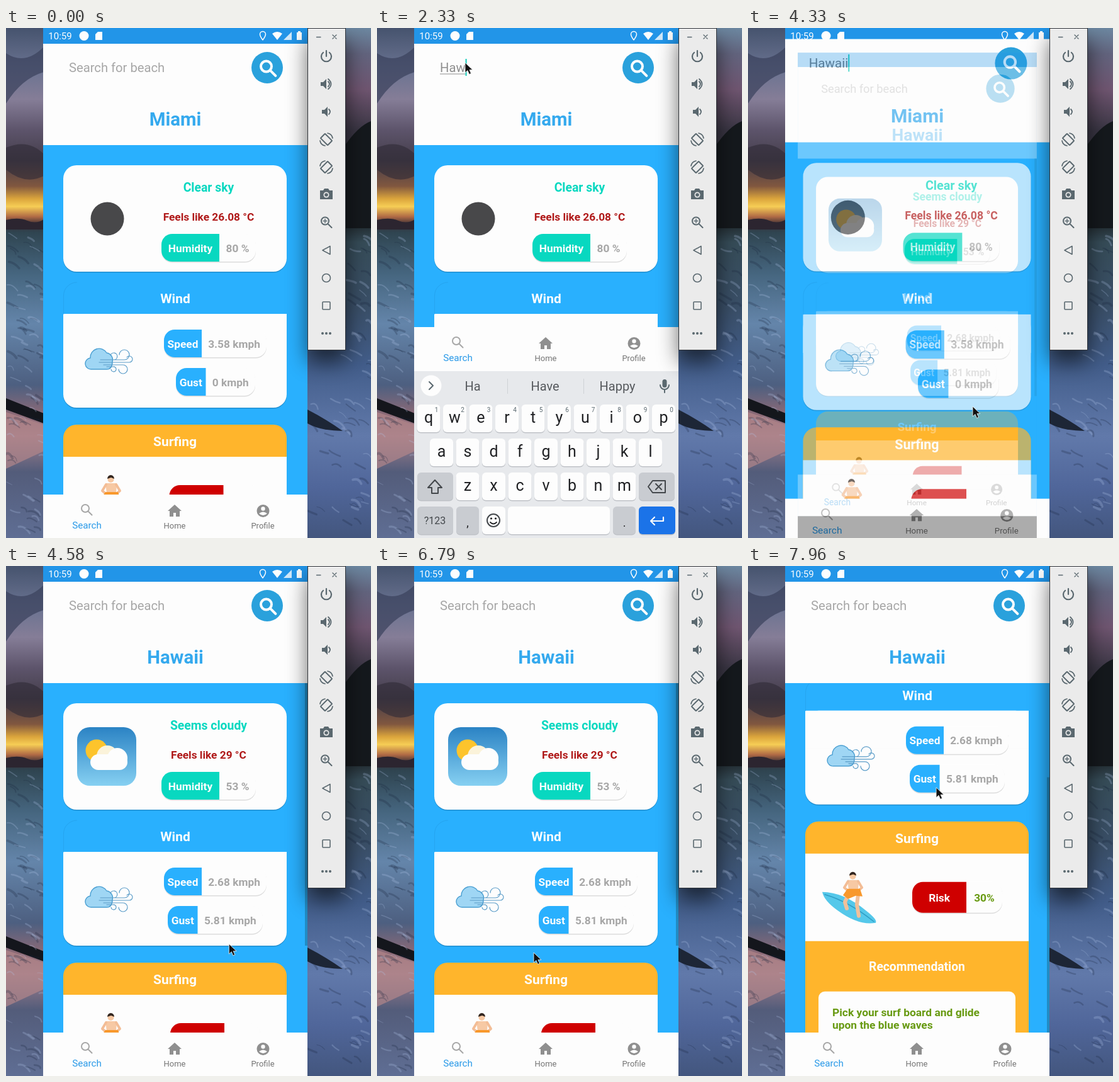
An HTML page that plays this animation: 580 by 810 pixels, repeating every 8000 ms.

```html
<!DOCTYPE html>
<html lang="en">
<head>
<meta charset="utf-8">
<title>Beach weather app</title>
<style>
html, body { margin: 0; width: 100%; height: 100%; overflow: hidden; }
svg { display: block; width: 580px; height: 810px; font-family: Roboto, "Open Sans", sans-serif; }
</style>
</head>
<body>
<svg id="stage" viewBox="0 0 580 810" xmlns="http://www.w3.org/2000/svg"></svg>
<script>
const LOOP = 8000;
const WHITE = '#fdfdfd', BLUE = '#29b0fe', PANEL = '#ebebeb', KEYS = '#e7e9ec', DARK_KEY = '#c9ccd1';
const GRAY = '#a7a7a7', ICON = '#5a686f', YELLOW = '#ffb52c', MINT = '#08d8c0';
const stage = document.getElementById('stage');

// ---- drawing helpers ----
const LEFT = 'style="text-anchor:start"';
const text = (x, y, size, fill, str, opt = '') =>
  `<text x="${x}" y="${y}" font-size="${size}" fill="${fill}" text-anchor="middle" ${opt}>${str}</text>`;
const bold = (x, y, size, fill, str, opt = '') => text(x, y, size, fill, str, 'font-weight="700" ' + opt);
const rect = (x, y, w, h, fill, r = 0, opt = '') =>
  `<rect x="${x}" y="${y}" width="${w}" height="${h}" rx="${r}" fill="${fill}" ${opt}/>`;
const circle = (x, y, r, fill, opt = '') => `<circle cx="${x}" cy="${y}" r="${r}" fill="${fill}" ${opt}/>`;
const path = (d, fill, opt = '') => `<path d="${d}" fill="${fill}" ${opt}/>`;
const line = (d, color, w, opt = '') =>
  path(d, 'none', `stroke="${color}" stroke-width="${w}" stroke-linecap="round" stroke-linejoin="round" ${opt}`);
const at = (x, y, body, opt = '') => `<g transform="translate(${x} ${y}) ${opt}">${body}</g>`;
const lens = (x, y, r, color, w) =>
  line(`M${x - r} ${y}a${r} ${r} 0 1 1 ${2 * r} 0a${r} ${r} 0 1 1 ${-2 * r} 0M${x + r * .75} ${y + r * .75}l${r} ${r}`, color, w);
const grad = (id, stops) => `<linearGradient id="${id}" x2="0" y2="1">` +
  stops.map(([o, c]) => `<stop offset="${o}" stop-color="${c}"/>`).join('') + '</linearGradient>';

function pill(x, y, w, h, tagW, color, tag, value, valueFill = GRAY) {
  const r = 17;
  return rect(x, y + 1.5, w, h, '#dcdcdc', r) + rect(x, y, w, h, WHITE, r) +
    path(`M${x + tagW} ${y}H${x + r}a${r} ${r} 0 0 0 ${-r} ${r}V${y + h - r}a${r} ${r} 0 0 0 ${r} ${r}H${x + tagW}Z`, color) +
    bold(x + tagW / 2, y + h / 2 + 6.5, 17.3, WHITE, tag) +
    bold(x + (tagW + w) / 2, y + h / 2 + 6.5, 17.3, valueFill, value);
}

// ---- wallpaper ----
function wallpaper() {
  let seed = 7;
  const rnd = () => (seed = seed * 16807 % 2147483647) / 2147483647;
  let s = rect(0, 0, 60, 810, 'url(#skyL)') + rect(479, 0, 101, 810, 'url(#skyR)') +
    path('M0 40Q30 60 60 30V70Q25 80 0 120Z', '#39415c', 'opacity=".7"') +
    path('M0 190Q35 175 60 200V235Q30 250 0 225Z', '#2f2a36', 'opacity=".6"') +
    path('M0 305Q20 300 34 306T60 304V320H0Z', '#2c2530') +
    path('M0 588L60 612V628L0 606Z', '#14161c') +
    path('M0 610L60 630V672L0 700Z', '#b3868a', 'opacity=".7"') +
    path('M536 190Q560 155 580 148V318H536Z', '#15191d') +
    path('M479 606Q510 622 535 640Q500 640 479 628Z', '#1d2636');
  for (let i = 0; i < 150; i++) {
    const left = i % 2, x = left ? rnd() * 56 : 480 + rnd() * 96, y = 325 + rnd() * 480;
    const tone = rnd() > .5 ? '#b4c8ea' : '#17243c';
    s += line(`M${x} ${y}q${4 + rnd() * 6} ${-4 + rnd() * 9} ${8 + rnd() * 10} ${3 + rnd() * 8}`, tone, 1 + rnd() * 3, 'opacity=".25"');
  }
  return s;
}

// ---- phone screen ----
const windIcon =
  path('M136 542a9 9 0 0 1-2-18a14 14 0 0 1 26-8a11 11 0 0 1 9 14q0 12-9 12Z', '#9fd6f4', 'stroke="#4a9fd2" stroke-width="1.4"') +
  line('M150 527H188a8 8 0 1 0-8-8M148 531H196a5 5 0 1 0-4-8M155 535H186a7 7 0 1 1-7 7M165 527h6a5.5 5.5 0 1 0-5-7M160 538h10a4 4 0 1 1-3 4', '#5a9cc8', 1.2);

const surfer = at(0, 112,
  path('M118 630Q152 630 188 660Q206 674 203 679Q176 684 142 659Q121 644 118 630Z', '#55c8ea') +
  line('M122 634Q160 645 200 677', '#2f9cc4', 1.5) +
  line('M159 635L154 646L157 656M175 634L173 650L176 668', '#f2c09a', 6) +
  path('M158 611H176L175 627H160Z', '#f7c9a4') +
  line('M159 613L153 623L160 629M175 613L181 623L174 629', '#f3bd96', 4) +
  path('M158 625H178L182 637L171 636L159 641L151 635Z', '#f8982c') +
  circle(166.5, 605, 5, '#f7c9a4') + path('M161 604a5.5 6 0 0 1 11 0l-5-2Z', '#33261f'));

const moon = circle(161, 303, 26.5, '#48484a');
const cloudy = rect(113, 256, 94, 93, 'url(#tile)', 20) + circle(144, 293, 17.5, '#fdc42c') +
  circle(161, 302, 17, '#fbf3da') + circle(177, 305, 16, WHITE) + rect(134, 299, 59, 25, WHITE, 12.5);

const statusIcons = text(86, 18, 15, WHITE, '10:59') + circle(124, 12.5, 7.5, WHITE) +
  path('M146 6H153V19H142V10Z', WHITE) +
  line('M408 19q-4.500-6-4.500-9a4.500 4.500 0 0 1 9 0q0 3-4.500 9Z', WHITE, 1.5) +
  path('M431 19L423 9Q431 3 439 9Z', WHITE) + path('M454 6V19H441Z', WHITE, 'opacity=".8"') +
  path('M462 7h2V5h4v2h2V19H462Z', WHITE);

const navBar = key => `<g id="${key}nav">` + rect(59, 741, 420, 73, WHITE) +
  lens(126, 763, 6, GRAY, 2) + text(128.5, 795, 15.2, '#2a9ae8', 'Search') +
  path('M268 757L257 767H260V776H266V770H270V776H276V767H279Z', '#8f8f8f') + text(268, 795, 13, '#757575', 'Home') +
  circle(408.5, 767, 10, '#8f8f8f') + circle(408.5, 763.5, 3.2, WHITE) + path('M402 771q6.500-5 13 0q-6.500 6-13 0Z', WHITE) +
  text(408, 795, 13, '#757575', 'Profile') + '</g>' + rect(59, 814, 420, 60, '#000');

const shadow = (y, h) => rect(91, y + 1.5, 355, h, '#238fcf', 21);

function screen(key, d) {
  const cards =
    shadow(218, 169) + rect(91, 218, 355, 169, WHITE, 21) + d.icon +
    bold(322, 260, 19.4, MINT, d.sky) + bold(322, 306, 17.3, '#b01a1a', `Feels like ${d.feels} °C`) +
    pill(247, 327, 150, 44, 92, MINT, 'Humidity', d.humidity + ' %') +
    shadow(500, 103) + rect(91, 454, 355, 149, WHITE, 21) + rect(91, 454, 355, 60, WHITE) +
    line('M91.500 454V425a21 21 0 0 1 21-21', '#25a4f0', 1) + bold(269, 437, 21, WHITE, 'Wind') + windIcon +
    pill(251, 479, 163, 44, 60, BLUE, 'Speed', d.speed + ' kmph') +
    pill(d.gustX, 540, d.gustW, 44, 47.5, BLUE, 'Gust', d.gust + ' kmph') +
    rect(91, 630, 355, 460, YELLOW, 21) + rect(91, 681, 355, 139, WHITE) +
    bold(268.5, 664, 21, WHITE, 'Surfing') + surfer +
    pill(d.riskX, 726, 665 - 2 * d.riskX, 49, 86, '#cf0000', 'Risk', d.risk, '#689a12') +
    bold(268.5, 867, 19.3, WHITE, 'Recommendation') + rect(112, 900, 313, 120, WHITE, 10) +
    bold(134, 939, 17.4, '#689a12', 'Pick your surf board and glide', LEFT) +
    bold(134, 959, 17.4, '#689a12', 'upon the blue waves', LEFT);
  return `<g id="${key}">` + rect(59, 0, 420, 814, BLUE) + `<g id="${key}scroll">${cards}</g>` +
    rect(59, 25, 420, 161, WHITE) + rect(59, 0, 420, 25, '#2295e8') +
    text(100, 70, 20.2, GRAY, 'Search for beach', `id="${key}hint" ${LEFT}`) +
    circle(415, 63, 25, '#2aa1dc') + lens(413.5, 61, 8.5, WHITE, 4) +
    bold(269, 155, 29.4, '#34a9ee', d.place) + (d.extra || '') + navBar(key) + '</g>';
}

// ---- keyboard ----
function keyboard() {
  const ink = '#202124', mark = '#44484c', rule = '#cfd2d6';
  const key = (x, y, w, fill = WHITE) => rect(x, y + 1.5, w, 44, '#bfc2c7', 6) + rect(x, y, w, 44, fill, 6);
  let s = rect(59, 545, 420, 320, KEYS) + circle(86, 568, 16.5, WHITE);
  const row = (chars, x0, y) => [...chars].forEach((c, i) => {
    const x = x0 + i * 41.5;
    s += key(x - 18.5, y, 37) + text(x, y + 29, 25, ink, c);
    if (y < 600) s += text(x + 12.5, y + 11.5, 10, ICON, (i + 1) % 10);
  });
  row('qwertyuiop', 82, 598);
  row('asdfghjkl', 102.5, 652);
  row('zxcvbnm', 144, 706);
  s += key(64, 706, 57, DARK_KEY) + line('M92 718L81 730H87V739H97V730H103Z', mark, 2) +
    key(416, 706, 57, DARK_KEY) + line('M438 719H458V738H438L431 728.500ZM443 724l9 9M452 724l-9 9', mark, 2) +
    key(64, 760, 57, DARK_KEY) + text(92, 788, 16, mark, '?123') +
    key(126, 760, 36, DARK_KEY) + text(144, 792, 18, ink, ',') +
    key(167, 760, 37) + circle(185, 782, 10, 'none', `stroke="${mark}" stroke-width="2"`) +
    circle(181.5, 779, 1.6, ink) + circle(188.5, 779, 1.6, ink) + line('M180 785q5 5 10 0', ink, 1.8) +
    key(208, 760, 162) + key(375, 760, 36, DARK_KEY) + text(393, 792, 18, ink, '.') +
    key(416, 760, 58, '#1b73e8') + line('M455 777V783H435M441 777L435 783L441 789', WHITE, 2.2) +
    rect(453.5, 558, 7, 13, ICON, 3.5) + line('M450 567a7 7 0 0 0 14 0M457 574V579', ICON, 2);
  s += '<g id="tools">' + line('M89 562L83 568L89 574', ICON, 2) + lens(139, 566.5, 6, ICON, 2.2) +
    line('M193 560H209V571L204 576H193ZM209 571H204V576M197 569q4 4 8 0M198 564v1M204 564v1', ICON, 2) +
    bold(260.5, 573, 14.5, ICON, 'GIF') + rect(314, 560, 16, 17, 'none', 1, `stroke="${ICON}" stroke-width="2"`) +
    rect(318, 557, 8, 5, ICON) + line('M318 566H326M318 570H326M318 574H323', ICON, 1.5) +
    rect(359, 557, 1, 24, rule) + [390, 397, 404].map(x => circle(x, 569, 2.2, ICON)).join('') + '</g>';
  s += '<g id="words">' + line('M83 562L89 568L83 574', ICON, 2) + rect(207, 557, 1, 24, rule) + rect(328, 557, 1, 24, rule) +
    [152, 267, 382].map(x => text(x, 576, 20, '#56595d', '')).join('') + '</g>';
  return `<g id="kb">${s}</g>`;
}

// ---- emulator side panel ----
function panel() {
  const x = 509, tilt = (y, flip) => at(x, y,
    rect(-8, -5, 16, 10, 'none', 1, `stroke="${ICON}" stroke-width="2" transform="rotate(45)"`) +
    line('M2 -10A10 10 0 0 1 10 -2M-2 10A10 10 0 0 1 -10 2', ICON, 1.7), flip ? 'scale(-1 1)' : '');
  return rect(479.5, .5, 60, 511, PANEL, 0, 'stroke="#2e3238"') +
    line('M493.500 14.500H500M519 11l6 6M525 11l-6 6', ICON, 1.3) +
    line('M504 39a8 8 0 1 0 10 0M509 36V45', ICON, 2.2) +
    path('M500 86h4l5-5v16l-5-5h-4Z', ICON) + line('M512 85q4 4 0 8M512 81q9 8 0 16', ICON, 1.8) +
    path('M502 130h4l5-5v16l-5-5h-4Z', ICON) + line('M513 129q4 4 0 8', ICON, 1.8) +
    tilt(177) + tilt(221, true) +
    path('M499 258h5l2-3h6l2 3h5v14H499Z', ICON) + circle(x, 265, 4.5, PANEL) + circle(x, 265, 2.8, ICON) +
    lens(507, 306.5, 6, ICON, 2) + line('M504 306.500h6M507 303.500v6', ICON, 1.4) +
    line('M515 346.500V359.500L503 353Z', ICON, 1.6) + circle(x, 397, 6.5, 'none', `stroke="${ICON}" stroke-width="1.6"`) +
    rect(503, 435, 12, 12, 'none', 1, `stroke="${ICON}" stroke-width="1.6"`) +
    [503, 509, 515].map(d => circle(d, 485, 2, ICON)).join('');
}

const typing = '<text id="typed" x="100" y="70" font-size="20.2"></text>' +
  rect(100, 72.5, 0, 1, '#8c8c8c', 0, 'id="under"') + rect(100, 49, 2, 27, '#16cdbb', 0, 'id="caret"');
const miami = { place: 'Miami', sky: 'Clear sky', feels: '26.08', humidity: 80, speed: '3.58', gust: 0,
  gustX: 270, gustW: 126, riskX: 259.5, risk: '50%', icon: moon, extra: typing };
const hawaii = { place: 'Hawaii', sky: 'Seems cloudy', feels: '29', humidity: 53, speed: '2.68', gust: '5.81',
  gustX: 257, gustW: 151, riskX: 261, risk: '30%', icon: cloudy,
  extra: rect(475, 186, 4, 417, '#1c6f96', 0, 'id="thumb" opacity=".55"') };

stage.innerHTML = '<defs>' +
  grad('skyL', [[0, '#46536e'], [.08, '#6a7391'], [.14, '#857d97'], [.2, '#5d546b'], [.26, '#443d4a'], [.31, '#80573f'], [.335, '#dba53c'],
    [.35, '#f6cd55'], [.37, '#b06a45'], [.385, '#3a2f35'], [.4, '#2f4450'], [.48, '#45657e'], [.58, '#6485aa'], [.7, '#4d5f80'],
    [.76, '#8d6a76'], [.8, '#a17f8c'], [.87, '#535c7a'], [1, '#5f6e94']]) +
  grad('skyR', [[0, '#6c87a0'], [.05, '#62647e'], [.12, '#6f5570'], [.2, '#3a3644'], [.38, '#1f262a'], [.42, '#364c58'],
    [.55, '#3a4f68'], [.66, '#425d8a'], [.8, '#6179aa'], [.9, '#50669a'], [1, '#43567e']]) +
  grad('tile', [[0, '#2b83c4'], [1, '#86d0f2']]) +
  '<filter id="blur" x="-2" y="-.2" width="5" height="1.4"><feGaussianBlur stdDeviation="17"/></filter>' +
  '<clipPath id="phone">' + rect(59, 0, 420, 810, '#fff') + '</clipPath></defs>' +
  wallpaper() + '<g clip-path="url(#phone)">' + screen('old', miami) + screen('fresh', hawaii) + statusIcons + keyboard() + '</g>' +
  rect(480, 18, 60, 512, '#000', 0, 'filter="url(#blur)" opacity=".6"') + panel() +
  path('M0 0V16L4 12.500L6.500 18.500L9.500 17.300L7 11.500H12Z', '#111', 'id="mouse" stroke="#f5f5f5" stroke-width=".8"');

// ---- motion ----
const $ = id => document.getElementById(id);
const set = (id, attrs) => { for (const k in attrs) $(id).setAttribute(k, attrs[k]); };
const show = (id, on) => $(id).setAttribute('visibility', on ? 'inherit' : 'hidden');
const part = (t, from, dur) => Math.min(1, Math.max(0, (t - from) / dur));
const smooth = p => p * p * (3 - 2 * p);

// Eased path through [time, x, y] stops.
function follow(stops, t) {
  const i = stops.findIndex(s => s[0] > t);
  if (i < 0) return stops[stops.length - 1].slice(1);
  if (i === 0) return stops[0].slice(1);
  const [a, b] = [stops[i - 1], stops[i]], p = smooth(part(t, a[0], b[0] - a[0]));
  return a.slice(1).map((v, k) => v + (b[k + 1] - v) * p);
}

const FOCUS = 880, SUBMIT = 3600, SWITCH = 4190, DRAG = 6960;
const mousePath = [[250, 230, -20], [750, 140, 55], [3500, 140, 55], [4250, 357, 601], [4500, 357, 601],
  [5600, 182, 548], [6000, 182, 548], [6800, 249, 614]];
const word = 'Hawaii', keyTimes = [1500, 1900, 2280, 2560, 2760, 2960];
const hints = ['H He Hey', 'Ha Have Happy', 'Haw Hawk Hawaii', 'Hawa Hawaii Hawaiian', 'Hawai Hawaii Hawaiian', 'Hawaii Hawaiian Hawaii’s'];

function draw(t) {
  const count = keyTimes.filter(k => k <= t).length;
  const typed = $('typed');
  typed.textContent = word.slice(0, count);
  const width = count ? typed.getComputedTextLength() : 0;
  const lastKey = count ? keyTimes[count - 1] : FOCUS;
  show('oldhint', !count);
  set('typed', { fill: t > SUBMIT ? '#6c6f73' : '#8f8f8f' });
  set('under', { width });
  show('under', t < SUBMIT);
  set('caret', { x: 100 + width });
  show('caret', t >= FOCUS && (t - lastKey) % 1000 < 500);

  const rise = 1 - part(t, 860, 220), drop = part(t, SUBMIT, 180);
  const low = 265 * Math.max(rise * rise, drop * drop);
  set('kb', { transform: `translate(0 ${low})` });
  show('kb', low < 265);
  const open = t >= FOCUS && t < SUBMIT + 150;
  set('oldnav', { transform: `translate(0 ${open ? -266 : 0})` });
  $('oldnav').firstElementChild.setAttribute('height', open ? 339 : 73);

  const shown = keyTimes.filter(k => k + 90 <= t).length;
  show('tools', !shown);
  show('words', shown);
  if (shown) {
    const list = hints[shown - 1].split(' ');
    $('words').querySelectorAll('text').forEach((w, i) => w.textContent = list[i]);
  }

  const p = part(t, SWITCH, 390);
  const zoom = s => `translate(269 410) scale(${s}) translate(-269 -410)`;
  set('old', { transform: zoom(1 + .055 * p) });
  set('fresh', { transform: zoom(.85 + .15 * p), opacity: p * (.8 + .2 * p) });
  show('old', p < 1);
  show('fresh', p > 0);

  // The finger drags the list at a steady speed.
  const drag = Math.max(0, t - DRAG), scroll = drag * .224;
  set('freshscroll', { transform: `translate(0 ${-scroll})` });
  set('thumb', { y: 186 + scroll * .667 });

  const [mx, my] = follow(mousePath, t);
  set('mouse', { transform: `translate(${mx + drag * .05} ${my - drag * .262})` });
}

const start = performance.now();
function tick() {
  draw((performance.now() - start) % LOOP);
  requestAnimationFrame(tick);
}
tick();
</script>
</body>
</html>
```
